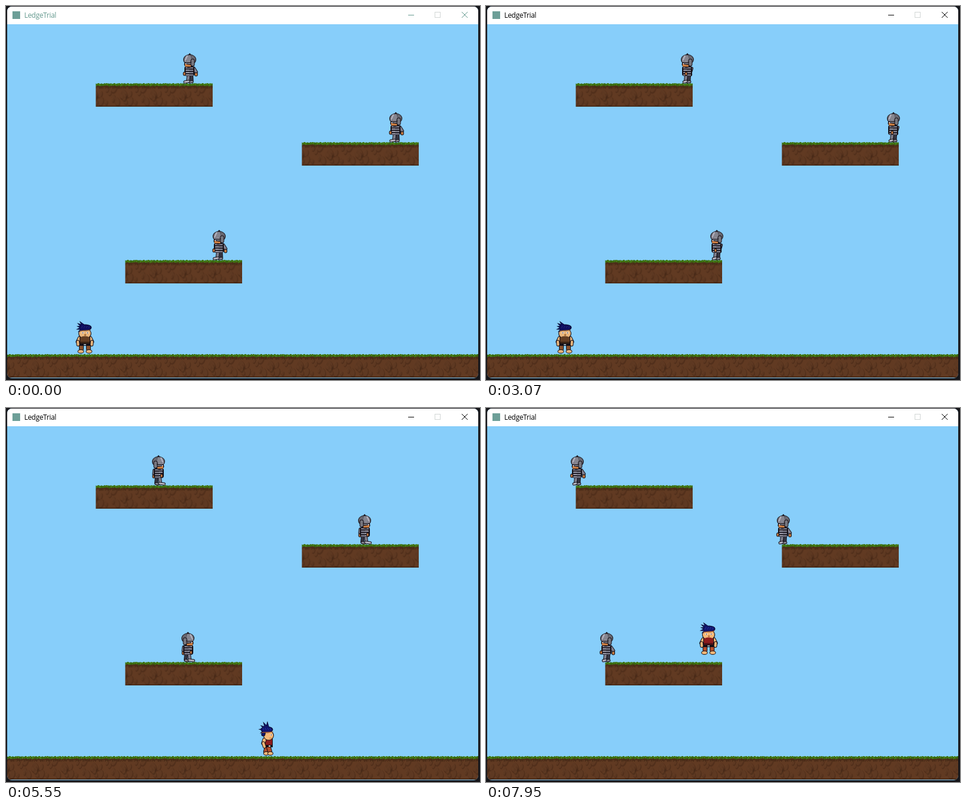
Write an HTML page with a canvas that moves like this. It is 805 by 635 pixels and loops after 8 s.

```html
<!DOCTYPE html>
<html lang="en">
<head>
<meta charset="utf-8">
<title>Platforms</title>
<style>
  html, body { margin: 0; width: 100%; height: 100%; overflow: hidden; background: #16161a; }
  canvas { position: absolute; left: 0; top: 0; }
  #title { position: absolute; left: 31px; top: 8px; font: 12px/16px "Open Sans", "Noto Sans", sans-serif; letter-spacing: -.3px; white-space: pre; }
</style>
</head>
<body>
<canvas id="stage" width="805" height="635"></canvas>
<span id="title">LedgeTrial</span>
<script>
const LOOP = 8000, STEP = 66.8;
const FOCUS_AT = 2200, VIVID_AT = 3600;
const LEFT = 2, TOP = 31;
const INK = '#140f16';
const title = document.getElementById('title');
let ctx = document.getElementById('stage').getContext('2d');

const rect = (color, x, y, w, h) => { ctx.fillStyle = color; ctx.fillRect(x, y, w, h); };
const boxed = (color, x, y, w, h) => { rect(INK, x, y, w, h); rect(color, x + 1, y + 1, w - 2, h - 2); };
const oval = (color, x, y, rx, ry, turn = 0) => {
  ctx.fillStyle = color;
  ctx.beginPath();
  ctx.ellipse(x, y, rx, ry, turn, 0, 7);
  ctx.fill();
};
const ringed = (color, x, y, rx, ry) => { oval(INK, x, y, rx, ry); oval(color, x, y, rx - 1, ry - 1); };
const line = (color, x1, y1, x2, y2, width = 1) => {
  ctx.strokeStyle = color;
  ctx.lineWidth = width;
  ctx.beginPath();
  ctx.moveTo(x1, y1);
  ctx.lineTo(x2, y2);
  ctx.stroke();
};
const limb = (color, x1, y1, x2, y2, width) => {
  ctx.lineCap = 'round';
  line(INK, x1, y1, x2, y2, width);
  line(color, x1, y1, x2, y2, width - 2);
  ctx.lineCap = 'butt';
};
const spike = (color, x, y, angle, length, base) => {
  const dx = Math.cos(angle), dy = Math.sin(angle);
  ctx.fillStyle = color;
  ctx.beginPath();
  ctx.moveTo(x - dy * base, y + dx * base);
  ctx.lineTo(x + dx * length, y + dy * length);
  ctx.lineTo(x + dy * base, y - dx * base);
  ctx.fill();
};

function paintTo(w, h, draw) {
  const sheet = document.createElement('canvas');
  sheet.width = w;
  sheet.height = h;
  const outer = ctx;
  ctx = sheet.getContext('2d');
  draw();
  ctx = outer;
  return sheet;
}

let seed = 11;
const random = () => (seed = seed * 16807 % 2147483647) / 2147483647;

const soil = paintTo(50, 40, () => {
  rect('#613a22', 0, 1, 50, 39);
  for (let i = 0; i < 16; i++) {
    const x = random() * 50, y = 8 + random() * 28, r = 3 + random() * 3, turn = random() - .5;
    for (const wrap of [-50, 0, 50]) {
      oval('rgba(60,34,19,.4)', x + wrap + 1, y + 1.5, r * .8, r * 1.4, turn);
      oval('rgba(104,64,38,.6)', x + wrap, y, r * .7, r * 1.2, turn);
    }
  }
  for (let x = 0; x < 50; x++) {
    rect('rgba(50,30,14,.45)', x, 4, 1, 2 + random() * 4);
    rect(random() < .5 ? '#37690f' : '#477f18', x, random() * 2 | 0, 1, 3 + random() * 2);
  }
  rect('rgba(45,26,14,.4)', 0, 38, 50, 2);
});

function ledge(x, y, w) {
  ctx.save();
  ctx.translate(LEFT + x, TOP + y);
  ctx.fillStyle = ctx.createPattern(soil, 'repeat');
  ctx.fillRect(0, 0, w, 40);
  ctx.restore();
}

const LEDGES = [[150, 100], [500, 200], [200, 400]];

const scenery = paintTo(805, 635, () => {
  rect('#16161a', 0, 0, 805, 635);
  ctx.beginPath();
  ctx.roundRect(LEFT, 1, 800, 631, 8);
  ctx.clip();
  rect('#87cefa', 0, 0, 805, 635);
  rect('#fff', 0, 0, 805, TOP);
  ledge(0, 560, 800);
  for (const [x, y] of LEDGES) ledge(x + .5, y, 198.5);
  rect('#6d9f98', 11, 9, 13, 13);
});

function drawWindowButtons(color) {
  line(color, 683, 15.5, 693, 15.5);
  line(color, 774, 10, 784, 20);
  line(color, 784, 10, 774, 20);
  ctx.strokeStyle = '#d2d6d5';
  ctx.strokeRect(728.5, 10.5, 9, 9);
}

// Sprites stand on y = 0, centred on x = 0, and face left.
function place(x, y, flip, draw) {
  ctx.save();
  ctx.translate(Math.round(x), Math.round(y));
  if (flip) ctx.scale(-1, 1);
  draw();
  ctx.restore();
}

const POSES = 6, POSE_TIME = 75;
const poseAt = time => Math.floor(time / POSE_TIME) % POSES;
const wave = (pose, peak) => Math.cos((pose - peak) * 2 * Math.PI / POSES);

function knight(pose) {
  const steel = '#81818f', light = '#b5b3c0', dark = '#363643', skin = '#c87c42';
  const reach = 8 + 3.5 * wave(pose, 3.4);
  const front = 4 - reach * 1.2;
  const toe = -7 - 2.5 * wave(pose, 5);

  limb(dark, 3, -13, 3 + wave(pose, 5), -4, 6);
  limb(steel, 0, -2, 4, -2.5, 5);
  limb(steel, -2, -13, -3, -4, 6);
  limb(light, toe, -2, -2, -3, 5);
  limb(steel, 7, -25, reach, -19, 6);
  ringed(skin, reach, -15, 3, 3.5);

  ctx.beginPath();
  ctx.roundRect(-9, -29, 17, 17, 4);
  ctx.fillStyle = INK;
  ctx.fill();
  for (let y = -27; y < -13; y += 4) {
    rect(steel, -7, y, 13, 2);
    rect(light, -6, y, 5, 1);
    rect(dark, -7, y + 2, 13, 1);
  }
  ringed(skin, front, -16, 2.5, 3.5);

  oval(INK, -2, -32, 7.5, 6);
  rect(skin, -8, -35, 10, 7);
  spike(INK, 0, -43, -Math.PI / 2, 8, 7);
  ringed('#696972', 0, -40, 11, 9);
  oval('#85858f', -2, -42, 6, 5);
  line(light, -8, -38, -4, -47, 2);
  line('#4a4a54', 2, -48, 4, -37);
  limb('#77777f', 5, -38, 5, -32, 7);
  rect(INK, -9, -36, 12, 1);
  rect(light, -9, -37, 10, 1);
  rect('#e6e9ee', -7, -34, 2, 2);
  rect('#263b66', -6, -34, 1, 2);
}

const DULL = { hair: '#0d0d60', shine: '#24266f', skin: '#e8b57c', shade: '#ae743f', vest: '#633d23', dark: '#3b2415', legs: '#8a5430', band: '#8d5a35' };
const VIVID = { hair: '#10146c', shine: '#20349c', skin: '#f4b878', shade: '#c47c42', vest: '#8d1d1d', dark: '#501216', legs: '#b5502c', band: '#d0702c' };

// A fan of spikes around the crown, drawn as outline and then as fill.
function hair(c, from, to) {
  for (const [color, edge] of [['#06061f', 0], [c.hair, 1]]) {
    for (let i = 0; i < 5; i++)
      spike(color, 0, -44, from + (to - from) * i / 4, 14.5 - edge * 2 + i % 2, 4 - edge);
    oval(color, 1, -44, 10.5 - edge, 5.5 - edge);
  }
  for (let x = -6; x < 8; x += 4) line(c.shine, x, -43, x + 2, -47);
}

function eye(x) {
  rect('#fff', x, -36, 3, 2);
  rect('#22346a', x + 1, -36, 1, 2);
}

function heroFront(c) {
  for (const side of [-1, 1]) {
    limb(c.legs, side * 6, -14, side * 6, -8, 8);
    ringed(c.skin, side * 7, -3.5, 5.5, 3.5);
    limb(c.skin, side * 9, -26, side * 12, -20, 7);
    limb(c.skin, side * 12, -20, side * 11.5, -15, 6);
  }
  boxed(c.vest, -9, -29, 18, 14);
  rect(c.dark, -8, -20, 16, 3);
  rect(INK, -9, -17, 18, 4);
  boxed('#9aa6ac', -3, -17, 6, 4);
  ringed(c.skin, 0, -34, 11, 9);
  oval(c.vest, 0, -27, 7, 2.5);
  rect(c.shade, -1, -33, 3, 3);
  eye(-5);
  eye(3);
  hair(c, Math.PI * .82, Math.PI * 1.28);
  line(c.band, -9, -38.5, 10, -40);
}

function heroSide(c, pose) {
  const swing = 4 * wave(pose, 2);
  limb(c.legs, 1, -14, 1 + swing, -7, 8);
  limb(c.legs, -2, -14, -2 - swing, -7, 8);
  ringed(c.skin, swing, -3.5, 5, 3.5);
  ringed(c.skin, -3 - swing, -3.5, 5, 3.5);
  boxed(c.vest, -9, -30, 15, 16);
  rect(INK, -9, -18, 15, 4);
  boxed('#dde0da', -6, -18, 5, 4);
  limb(c.skin, 5, -27, 7, -21, 7);
  limb(c.skin, 7, -21, 6 - swing / 2, -15, 6);
  ringed(c.skin, -2, -34, 9, 8.5);
  eye(-8);
  rect(c.shade, -8, -30, 5, 1);
  limb(c.hair, 6, -42, 7, -36, 7);
  hair(c, -Math.PI * .5, Math.PI * .15);
  line(c.band, -10, -40, 10, -39);
}

const PATROL = { left: 152, right: 351, time: 1660, lead: 324 };

function patrolAt(t) {
  const { left, right, time, lead } = PATROL;
  const lap = Math.floor((t + lead) / time);
  const since = t + lead - lap * time;
  const walked = (right - left) * since / time;
  const facingRight = lap % 2 === 1;
  return { x: facingRight ? left + walked : right - walked, facingRight, pose: poseAt(since) };
}

const HERO_PATH = [[0, 134], [3630, 134], [3825, 88], [4020, 134], [4215, 134], [6553, 679], [7844, 378], [LOOP, 378]];
const JUMP = { starts: [5606, 7360], time: 886, height: 192 };

function heroAt(t) {
  const next = HERO_PATH.findIndex(([at]) => t < at);
  const [t0, x0] = HERO_PATH[next - 1], [t1, x1] = HERO_PATH[next];
  const lift = Math.max(0, ...JUMP.starts.map(start => {
    const p = (t - start) / JUMP.time;
    return 4 * JUMP.height * p * (1 - p);
  }));
  return { x: x0 + (x1 - x0) * (t - t0) / (t1 - t0), y: 590 - lift, heading: Math.sign(x1 - x0), pose: lift ? 1 : poseAt(t) };
}

function render(time) {
  const t = Math.floor((time + 5) / STEP) * STEP;
  const color = t < FOCUS_AT ? '#659a8f' : '#000';
  title.style.color = color;
  ctx.drawImage(scenery, 0, 0);
  drawWindowButtons(color);

  const guard = patrolAt(t);
  for (const [x, y] of LEDGES)
    place(guard.x + x - LEDGES[0][0], TOP + y, guard.facingRight, () => knight(guard.pose));

  const hero = heroAt(t), colors = t < VIVID_AT ? DULL : VIVID;
  place(hero.x, hero.y, hero.heading > 0, () => hero.heading ? heroSide(colors, hero.pose) : heroFront(colors));
}

const began = performance.now();
function tick() {
  render((performance.now() - began) % LOOP);
  requestAnimationFrame(tick);
}
tick();
</script>
</body>
</html>
```
